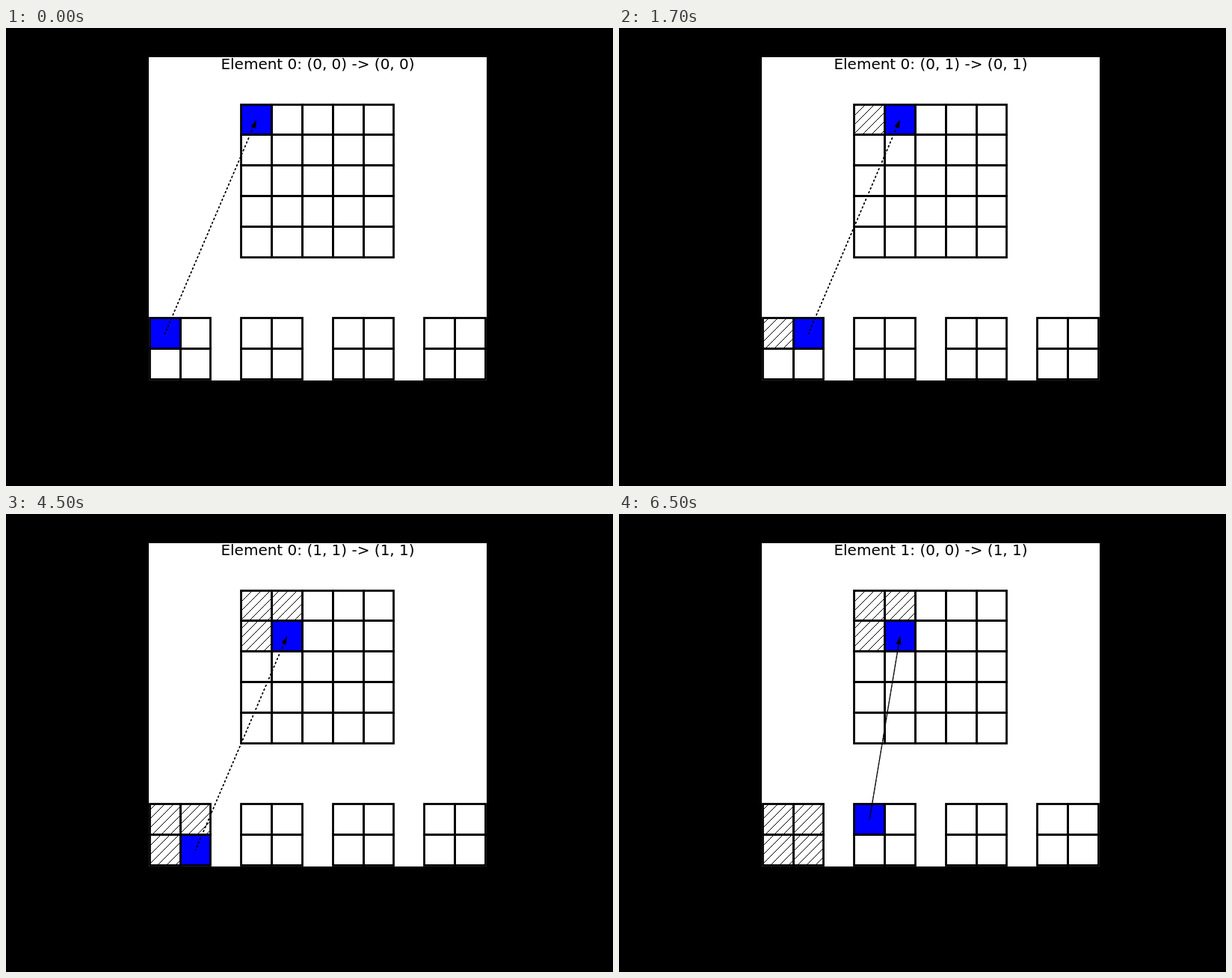
These frames come from a looping animation (812 by 612 pixels, 8000 ms). An HTML page with a canvas:

```html
<!DOCTYPE html>
<html lang="en">
<head>
<meta charset="utf-8">
<title>Element assembly</title>
<style>
  html, body { margin: 0; width: 100%; height: 100%; overflow: hidden; background: #000; }
  canvas { display: block; }
</style>
</head>
<body>
<canvas id="stage" width="812" height="612"></canvas>
<script>
const ctx = document.getElementById('stage').getContext('2d');
const CELL = 40.84, LOOP = 8000, HATCH = 12;
const gridX = col => Math.floor(192.2 + col * CELL) + 0.5;
const gridY = row => Math.floor(102.04 + row * CELL) + 0.5;
const center = ([col, row]) => [192.2 + (col + 0.5) * CELL, 102.04 + (row + 0.5) * CELL];

// Four steps per element, one for each cell of its 2x2 matrix.
function move(step) {
  const element = step >> 2, row = step >> 1 & 1, col = step & 1;
  return {
    from: [element * 3 + col, 7 + row],
    to: [3 + element + col, element + row],
    label: `Element ${element}: (${row}, ${col}) -> (${element + row}, ${element + col})`
  };
}

function cellBox([col, row]) {
  const x = gridX(col), y = gridY(row);
  return [x, y, gridX(col + 1) - x, gridY(row + 1) - y];
}

function hatch(cell) {
  const [x, y, w, h] = cellBox(cell);
  ctx.save();
  ctx.beginPath();
  ctx.rect(x, y, w, h);
  ctx.clip();
  ctx.beginPath();
  for (let sum = Math.ceil((x + y) / HATCH) * HATCH; sum < x + y + w + h; sum += HATCH) {
    ctx.moveTo(sum - y, y);
    ctx.lineTo(sum - y - h, y + h);
  }
  ctx.lineWidth = 1;
  ctx.stroke();
  ctx.restore();
}

function fill(cell, color) {
  ctx.fillStyle = color;
  ctx.fillRect(...cellBox(cell));
}

function grid(col, row, size) {
  ctx.lineWidth = 2.78;
  for (let r = 0; r < size; r++)
    for (let c = 0; c < size; c++) ctx.strokeRect(...cellBox([col + c, row + r]));
}

// The dotted outline runs down one side of the shaft and back up the other.
function arrow(from, to) {
  const [x1, y1] = center(from), [x2, y2] = center(to);
  const length = Math.hypot(x2 - x1, y2 - y1), head = 11;
  ctx.save();
  ctx.translate(x2, y2);
  ctx.rotate(Math.atan2(y2 - y1, x2 - x1));
  ctx.lineWidth = 1.39;
  ctx.lineCap = 'square';
  ctx.setLineDash([1.39, 4.167]);
  for (const side of [1, -1]) {
    ctx.lineDashOffset = 0.7 + side * (length - 311.05);
    ctx.beginPath();
    ctx.moveTo(-length, 0);
    ctx.lineTo(-head, 0);
    ctx.stroke();
  }
  ctx.fillStyle = '#000';
  ctx.beginPath();
  ctx.moveTo(0, 0);
  ctx.lineTo(-head, -3.5);
  ctx.lineTo(-head, 3.5);
  ctx.fill();
  ctx.restore();
}

function draw(step) {
  ctx.fillStyle = '#000';
  ctx.fillRect(0, 0, 812, 612);
  ctx.save();
  ctx.beginPath();
  ctx.rect(191, 39, 452, 432);
  ctx.clip();
  ctx.fillStyle = '#fff';
  ctx.fillRect(191, 39, 452, 432);
  ctx.strokeStyle = '#000';

  for (let i = 0; i < step; i++) {
    const done = move(i);
    hatch(done.from);
    hatch(done.to);
  }
  const { from, to, label } = move(step);
  fill(from, '#00f');
  fill(to, '#00f');
  grid(3, 0, 5);
  for (let e = 0; e < 4; e++) grid(e * 3, 7, 2);
  arrow(from, to);

  ctx.fillStyle = '#000';
  ctx.font = '20px "DejaVu Sans", sans-serif';
  ctx.textAlign = 'center';
  ctx.fillText(label, 417, 55);
  ctx.restore();
}

function frame(now) {
  draw(Math.floor((now % LOOP + 1500) / 2000));
  requestAnimationFrame(frame);
}
requestAnimationFrame(frame);
</script>
</body>
</html>
```
